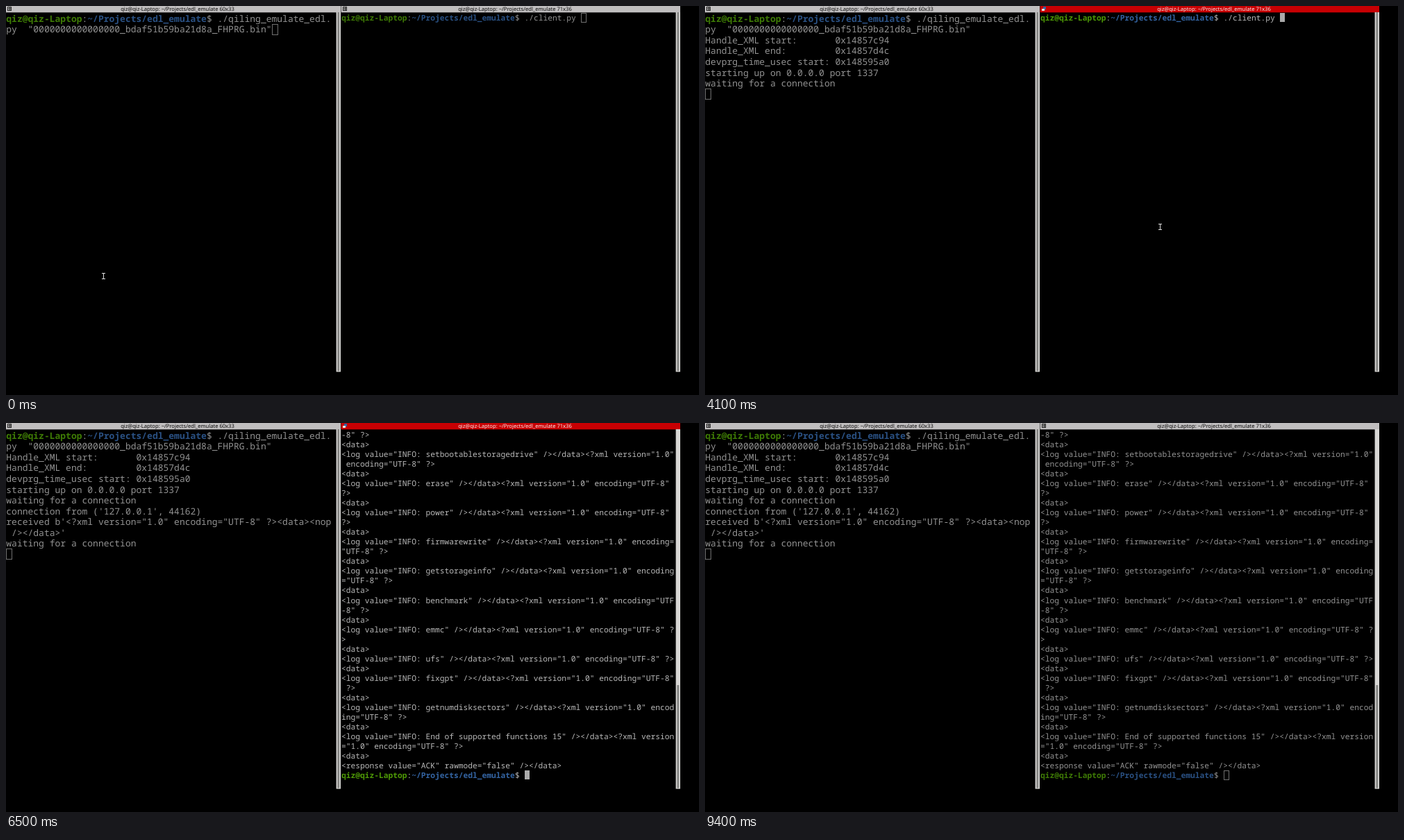
Animation, 998 px wide and 561 px high, one loop 9500 ms. Source, as an HTML page with a canvas:

```html
<!DOCTYPE html>
<html lang="en">
<head>
<meta charset="utf-8">
<title>Two terminals</title>
<style>
html, body { margin: 0; width: 100%; height: 100%; overflow: hidden; background: #000; }
canvas { display: block; }
</style>
</head>
<body>
<canvas id="stage" width="998" height="561"></canvas>
<script>
const ctx = document.getElementById('stage').getContext('2d');
const LOOP = 9500, STEP = 100;
const MONO = '"Noto Sans Mono", "DejaVu Sans Mono", monospace';
const SANS = '"Open Sans", "Noto Sans", sans-serif';
const USER = 'qiz', HOST = 'qiz-Laptop', DIR = '~/Projects/edl_emulate';

const BRIGHT = { text: '#b8b8b8', green: '#4e9a06', blue: '#3465a4' };
const DIM = { text: '#929292', green: '#3e7b05', blue: '#2a5184' };

const left = { x: 0.3, cell: 7.8, row: 15.57, size: 13, base: 12.7, barX: 475.6, titleX: 0, titleW: 482, grid: '60x33' };
const right = { x: 483, cell: 6.757, row: 14.03, size: 11.26, base: 11, barX: 964.6, titleX: 482.5, titleW: 488.5, grid: '71x36' };

const command = ['$./qiling_emulate_edl.', 'py  "0000000000000000_bdaf51b59ba21d8a_FHPRG.bin"'];
const startup = [
  'Handle_XML start:       0x14857c94',
  'Handle_XML end:         0x14857d4c',
  'devprg_time_usec start: 0x148595a0',
  'starting up on 0.0.0.0 port 1337',
  'waiting for a connection'
];
const xmlHead = '<?xml version="1.0" encoding="UTF-8" ?>';
const received = ["connection from ('127.0.0.1', 44162)", `received b'${xmlHead}<data><nop`];
const sending = ['connecting to localhost port 1337', `Sending : ${xmlHead}<data><nop /></data>`];

const wrap = (s, n) => s.match(new RegExp(`.{1,${n}}`, 'g'));
const features = ['setbootablestoragedrive', 'erase', 'power', 'firmwarewrite', 'getstorageinfo',
  'benchmark', 'emmc', 'ufs', 'fixgpt', 'getnumdisksectors', 'End of supported functions 15'];
const reply = [
  '-8" ?>',
  ...features.flatMap(f => ['<data>', ...wrap(`<log value="INFO: ${f}" /></data>${xmlHead}`, 71)]),
  '<data>',
  '<response value="ACK" rawmode="false" /></data>',
  '$'
];

function rect(x, y, w, h, color) {
  ctx.fillStyle = color;
  ctx.fillRect(x, y, w, h);
}

function put(p, col, row, str, color, bold) {
  ctx.font = `${bold ? 'bold ' : ''}${p.size}px ${MONO}`;
  ctx.fillStyle = color;
  ctx.fillText(str, p.x + col * p.cell, 10 + row * p.row + p.base);
}

// A line that starts with "$" gets the shell prompt in front.
function putLine(p, row, str, pal) {
  if (str[0] !== '$') return put(p, 0, row, str, pal.text);
  const who = `${USER}@${HOST}`;
  const dirCol = who.length + 1;
  put(p, 0, row, who, pal.green, true);
  put(p, who.length, row, ':', pal.text);
  put(p, dirCol, row, DIR, pal.blue, true);
  put(p, dirCol + DIR.length, row, '$ ' + str.slice(1), pal.text);
}

function titleBar(p, active) {
  rect(p.titleX, 0, p.titleW, 9.3, active ? '#c80003' : '#c0bebf');
  ctx.font = `7.63px ${SANS}`;
  ctx.fillStyle = active ? '#ffffff' : '#000000';
  ctx.textAlign = 'center';
  ctx.fillText(`${USER}@${HOST}: ${DIR} ${p.grid}`, p.titleX ? 733 : 247, 7.2);
  ctx.textAlign = 'left';
  const x = Math.ceil(p.titleX) + 2;
  if (active) {
    rect(x + 2, 1, 4, 4, '#3465a4');
    rect(x, 4, 4, 3, '#e8e8e8');
  } else {
    ctx.strokeStyle = '#222';
    ctx.lineWidth = 1;
    ctx.strokeRect(x + 0.5, 1.5, 5, 5);
    rect(x + 1, 3.5, 4, 1, '#222');
    rect(x + 3, 2, 1, 4, '#222');
  }
}

function scrollBar(p, thumbTop) {
  rect(p.barX, 9, 6.4, 518.6, '#d8d7d5');
  rect(p.barX + 1.8, thumbTop, 2.8, 526.5 - thumbTop, '#848482');
}

function cursor(p, col, row, kind) {
  const x = Math.round(p.x + col * p.cell);
  const y = Math.round(10 + row * p.row);
  const w = Math.round(p.cell), h = Math.round(p.row) - 1;
  if (kind === 'full') rect(x, y, w, h, '#aaaaaa');
  if (kind === 'hollow') {
    ctx.strokeStyle = '#707070';
    ctx.lineWidth = 1;
    ctx.strokeRect(x + 0.5, y + 0.5, w, h);
  }
}

function pointer(x, y) {
  const beam = (grow, color) => {
    rect(x - 2 - grow, y - 4 - grow, 5 + 2 * grow, 1 + 2 * grow, color);
    rect(x - grow, y - 4 - grow, 1 + 2 * grow, 9 + 2 * grow, color);
    rect(x - 2 - grow, y + 4 - grow, 5 + 2 * grow, 1 + 2 * grow, color);
  };
  beam(1, '#000');
  beam(0, '#ddd');
}

const within = (t, a, b) => t >= a && t < b;

function drawLeft(t) {
  const active = within(t, 200, 2900);
  const lines = [...command];
  if (t >= 1600) lines.push(...startup);
  if (t >= 4400) lines.push(...received, (t < 6500 ? '_' : ' ') + "/></data>'");
  if (t >= 6500) lines.push('waiting for a connection');
  titleBar(left, active);
  scrollBar(left, 9);
  lines.forEach((s, i) => putLine(left, i, s, active ? BRIGHT : DIM));
  const off = within(t, 900, 1200) || within(t, 1800, 2400);
  const kind = !active ? 'hollow' : off ? 'none' : 'full';
  if (t < 1200) cursor(left, 49, 1, kind);
  else cursor(left, 0, lines.length, kind);
}

function drawRight(t) {
  const active = within(t, 2900, 9400);
  const done = t >= 6500;
  const lines = done ? reply : ['$./client.py', ...(t >= 4300 ? sending : [])];
  titleBar(right, active);
  scrollBar(right, done ? 378 : 9);
  lines.forEach((s, i) => putLine(right, i, s, active ? BRIGHT : DIM));
  const off = [[3400, 4000], [4900, 5500], [6100, 6500], [7700, 8300], [8900, 9400]]
    .some(([a, b]) => within(t, a, b));
  const kind = !active ? 'hollow' : off ? 'none' : 'full';
  if (done) cursor(right, 39, 35, kind);
  else if (t >= 4300) cursor(right, 0, 3, kind);
  else cursor(right, 51, 0, kind);
}

function drawPointer(t) {
  if (t < 1300) pointer(140, 389);
  else if (within(t, 2000, 2400)) {
    const k = Math.min(1, (t - 1900) / 300);
    pointer(Math.round(140 + 477 * k), Math.round(389 - 65 * k));
  } else if (within(t, 2400, 4300)) pointer(t < 2900 ? 654 : 655, 318);
}

function draw(now) {
  const t = Math.floor((now % LOOP) / STEP) * STEP;
  rect(0, 0, 998, 561, '#000');
  ctx.textRendering = 'geometricPrecision';
  drawLeft(t);
  drawRight(t);
  drawPointer(t);
}

const start = performance.now();
function tick() {
  draw(performance.now() - start);
  requestAnimationFrame(tick);
}
tick();
</script>
</body>
</html>
```
